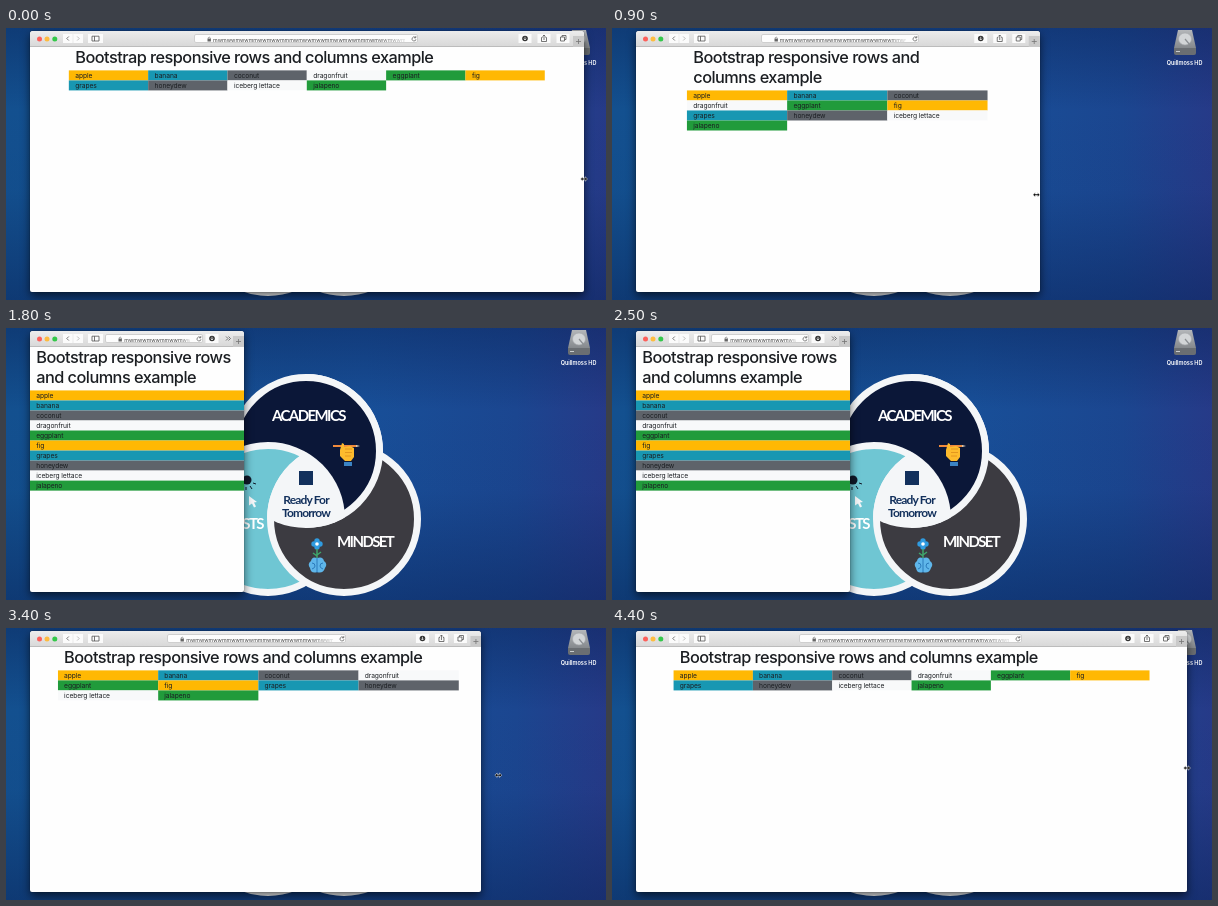
An HTML page that plays this animation: 600 by 272 pixels, repeating every 4500 ms.

```html
<!DOCTYPE html>
<html lang="en">
<head>
<meta charset="utf-8">
<title>Responsive rows and columns</title>
<style>
  html, body { margin: 0; width: 100%; height: 100%; overflow: hidden; background: #0d3066; }
  #stage { position: relative; width: 600px; height: 272px; overflow: hidden; }
  svg { position: absolute; left: 0; top: 0; display: block; }
  .wide { font: 700 15px Lato, sans-serif; letter-spacing: -1.6px; fill: #fff; }
  .motto { font: 700 12px Lato, sans-serif; letter-spacing: -.85px; fill: #12305c; text-anchor: middle; }
  .disk { font: 600 5.5px Inter, sans-serif; fill: #fff; text-anchor: middle; }

  #win { position: absolute; left: 24px; top: 3px; height: 261px; overflow: hidden; background: #fefefe;
    border-radius: 3px 3px 2px 2px; box-shadow: 0 4px 10px #0009, 0 0 1px #000a; }
  #tools { position: absolute; left: 0; top: 0; width: 100%; height: 16px; box-sizing: border-box;
    background: linear-gradient(#ececec, #d9d9d9); border-bottom: 1px solid #bcbcbc; }
  #bar { position: absolute; top: 3px; height: 9px; box-sizing: border-box; background: #fdfdfd;
    border: .5px solid #cfcfcf; border-radius: 2px; overflow: hidden; }
  #url { position: absolute; left: 18px; right: 12px; top: .5px; overflow: hidden; white-space: nowrap;
    font: 5.3px/8px Inter, sans-serif; color: #444;
    -webkit-mask: linear-gradient(90deg, #000 85%, #0003); mask: linear-gradient(90deg, #000 85%, #0003); }
  #reload { left: auto; right: -1px; }

  #page { position: absolute; left: 0; top: 15.5px; transform: scale(.4175); transform-origin: 0 0;
    font: 400 16px/24px Inter, sans-serif; letter-spacing: -.2px; color: #1b1e22; }
  #box { margin: 0 auto; }
  h1 { margin: 0 0 8px; padding: 0 15px; font-size: 39px; font-weight: 500; line-height: 48px; letter-spacing: -1.25px; }
  #row { display: flex; flex-wrap: wrap; }
  #row div { box-sizing: border-box; padding: 0 15px; height: 24px; white-space: nowrap; }
</style>
</head>
<body>
<div id="stage">
  <svg width="600" height="272">
    <defs>
      <linearGradient id="sky">
        <stop stop-color="#13508f"/><stop offset=".6" stop-color="#184f98"/><stop offset=".85" stop-color="#1b4690"/><stop offset="1" stop-color="#263a88"/>
      </linearGradient>
      <linearGradient id="shade" x2="0" y2="1">
        <stop stop-color="#0a2358" stop-opacity=".45"/><stop offset=".3" stop-color="#0a2358" stop-opacity="0"/>
        <stop offset=".6" stop-color="#0a2358" stop-opacity=".05"/><stop offset="1" stop-color="#0a2358" stop-opacity=".5"/>
      </linearGradient>
      <linearGradient id="metal" x2="0" y2="1"><stop stop-color="#b4b7ba"/><stop offset="1" stop-color="#85898d"/></linearGradient>
      <clipPath id="inA"><circle cx="300" cy="123" r="77"/></clipPath>
      <clipPath id="inB"><circle cx="262" cy="191" r="77"/></clipPath>
      <clipPath id="right"><path d="M300 0H600V272H300z"/></clipPath>
    </defs>
    <rect width="600" height="272" fill="url(#sky)"/>
    <rect width="600" height="272" fill="url(#shade)"/>
    <g stroke="#f4f6f8" stroke-width="7">
      <circle id="top" cx="300" cy="123" r="73.500" fill="#0b1738"/>
      <circle cx="262" cy="191" r="73.500" fill="#6fc6d3"/>
      <circle cx="338" cy="191" r="73.500" fill="#3c3b41"/>
      <use href="#top" clip-path="url(#right)"/>
    </g>
    <g clip-path="url(#inA)"><g clip-path="url(#inB)"><circle cx="338" cy="191" r="77" fill="#f4f6f8"/></g></g>
    <text class="wide" x="266" y="92.500">ACADEMICS</text>
    <text class="wide" x="331" y="218.500">MINDSET</text>
    <text class="wide" x="257" y="201" text-anchor="end">INTERESTS</text>
    <rect x="293" y="143" width="14" height="14" fill="#12305c"/>
    <text class="motto" x="300" y="176">Ready For</text>
    <text class="motto" x="300" y="188.500">Tomorrow</text>
    <!-- hand with pencil -->
    <path d="M327 118H350" stroke="#f08a3c" stroke-width="2"/>
    <path d="M350 117L354 118L350 119z" fill="#f3dfc0"/>
    <path d="M334 122l2-7 2 1v3l6-1 4 2v9l-3 4h-6l-5-5z" fill="#fdbb2d"/>
    <path d="M339 121h7M339 124.500h7M339 128h6" stroke="#dd8f1c" stroke-width=".8"/>
    <path d="M338 134h8v4h-8z" fill="#3b83c4"/>
    <!-- flower over brain -->
    <g fill="#2f9be0"><circle cx="311" cy="213" r="2.700"/><circle cx="308" cy="216" r="2.700"/><circle cx="314" cy="216" r="2.700"/><circle cx="311" cy="219" r="2.700"/></g>
    <circle cx="311" cy="216" r="1.800" fill="#fff"/>
    <path d="M311 221V230M311 227l4-3M311 228l-4-3" stroke="#3fa66b" stroke-width="1.500" fill="none"/>
    <path d="M311 230q-5-2-6 3q-4 3-1 7q1 6 7 4q6 2 8-4q3-4-1-7q-1-5-7-3z" fill="#5fb6ea"/>
    <path d="M311 230V245M306 235q3 0 3 3M317 235q-3 0-3 3M306 241q3-1 3-3M317 241q-3-1-3-3" stroke="#1f6db0" stroke-width=".8" fill="none"/>
    <!-- click mark and pointer -->
    <circle cx="241" cy="152" r="4.500" fill="#101828"/>
    <path d="M244 158l2 3M247 155l3 1M240 159v3" stroke="#101828"/>
    <path d="M243 168l8 6-3 .5 2 4-2 1-2-4-3 2z" fill="#f4f6f8"/>
    <!-- disk -->
    <path d="M566 2H580L584 20H562z" fill="url(#metal)"/>
    <path d="M562 20H584V25q0 2-2 2H564q-2 0-2-2z" fill="#6a6e72"/>
    <ellipse cx="573" cy="11" rx="6.500" ry="6" fill="#d2d5d7" stroke="#a4a8ac" stroke-width=".6"/>
    <path d="M573 11l5 6" stroke="#8b8f93" stroke-width="1.200"/>
    <path d="M564 23.500H568" stroke="#c8cccf"/>
    <text class="disk" x="572.500" y="37">Quillmoss HD</text>
  </svg>

  <div id="win">
    <div id="tools">
      <svg width="576" height="16" viewBox="24 3 576 16" fill="none" stroke="#555" stroke-width=".8">
        <g stroke="none">
          <circle cx="33.500" cy="11" r="2.500" fill="#fc605b"/><circle cx="41" cy="11" r="2.500" fill="#fdbc40"/><circle cx="48.800" cy="11" r="2.500" fill="#34c84a"/>
          <path d="M57 6h9.700v9H57zM67.300 6H77v9h-9.700zM82 6H97v9H82z" fill="#fbfbfb"/>
        </g>
        <path d="M62.800 8.500l-2 2 2 2"/><path d="M71.200 8.500l2 2-2 2" stroke="#aaa"/>
        <path d="M86 8.200h7v4.800h-7zM88.500 8.200V13"/>
        <g id="full">
          <path d="M-65.500 6h13v9h-13zM-46.500 6h13v9h-13zM-27.500 6h13v9h-13z" fill="#fbfbfb" stroke="none"/>
          <path d="M-41.500 9.500h-1v4h5v-4h-1M-40 12V7M-41.500 8.500l1.500-1.500 1.500 1.500M-23.500 9h4v4h-4zM-22 9V7.500h4v4h-1.500"/>
        </g>
        <g id="slim">
          <path d="M-38.500 6h13v9h-13z" fill="#fbfbfb" stroke="none"/>
          <path d="M-18 8.500l2 2-2 2M-15.500 8.500l2 2-2 2"/>
        </g>
        <g id="load"><circle cy="10.500" r="2.800" fill="#333" stroke="none"/><path d="M0 8.800v3M-1.300 10.700l1.300 1.300 1.300-1.300" stroke="#fff" stroke-width=".7"/></g>
        <g id="plus"><path d="M-11 8H0V19H-11z" fill="#c9c9c9" stroke="none"/><path d="M-8 13.500h5M-5.500 11v5" stroke="#777"/></g>
      </svg>
      <div id="bar">
        <svg width="18" height="9"><path d="M12.500 3.800h3.400v2.700h-3.400z" fill="#666"/><path d="M13.200 4V2.800q1-1.500 2 0V4" fill="none" stroke="#666" stroke-width=".6"/></svg>
        <div id="url"></div>
        <svg id="reload" width="8" height="8"><path d="M5.500 2.600A2 2 0 1 0 6 4.200M5.800 1v1.800H4" fill="none" stroke="#555" stroke-width=".7"/></svg>
      </div>
    </div>
    <div id="page"><div id="box">
      <h1>Bootstrap responsive rows and columns&nbsp;example</h1>
      <div id="row"></div>
    </div></div>
  </div>

  <svg width="600" height="272">
    <g id="cursor"><path d="M-3.500 0l2.300-2.200v1.400h2.400v-1.400L3.500 0 1.200 2.200V.8h-2.400v1.400z" fill="#111" stroke="#fff" stroke-width=".5"/></g>
  </svg>
</div>
<script>
const $ = id => document.getElementById(id);
const LEFT = 24, SCALE = .4175, STEP = 100, LOOP = 4500, MIN_EDGE = 238;
const fruits = 'apple,banana,coconut,dragonfruit,eggplant,fig,grapes,honeydew,iceberg lettace,jalapeno'.split(',');
const tints = ['#ffb803', '#1897b2', '#5e636a', '#f8f9fa', '#219b3b'];
// Smallest page width, container width, columns
const grid = [[1200, 1140, 6], [992, 960, 4], [768, 720, 3], [576, 540, 2], [0, 0, 1]];

// Time, window edge, pointer x, pointer y
const drag = [
  [0, 578, 578, 151], [500, 514, 514, 151], [1200, 356, 351, 177], [1750, 238, 238, 177],
  [2500, 238, 238, 170], [3000, 385, 406, 157], [3900, 552, 559, 140], [4400, 575, 575, 140], [4500, 578, 578, 151]
];

const cells = fruits.map((name, i) => {
  const cell = document.createElement('div');
  cell.textContent = name;
  cell.style.background = tints[i % tints.length];
  $('row').append(cell);
  return cell;
});
$('url').textContent = 'mwmwwmwwmmwwmwwmm'.repeat(5);

// Monotone cubic through one column of the drag path
function along(t, col) {
  const secant = i => (drag[i + 1][col] - drag[i][col]) / (drag[i + 1][0] - drag[i][0]);
  const slope = i => {
    if (i === 0 || i === drag.length - 1) return secant(i ? i - 1 : 0);
    const a = secant(i - 1), b = secant(i);
    return a * b > 0 ? 2 * a * b / (a + b) : 0;
  };
  let i = 0;
  while (i < drag.length - 2 && t >= drag[i + 1][0]) i++;
  const h = drag[i + 1][0] - drag[i][0], u = (t - drag[i][0]) / h, v = 1 - u;
  return v * v * (1 + 2 * u) * drag[i][col] + u * u * (3 - 2 * u) * drag[i + 1][col]
    + h * u * v * (v * slope(i) - u * slope(i + 1));
}

const move = (id, x, y = 0) => $(id).setAttribute('transform', `translate(${x} ${y})`);
const show = (id, on) => $(id).style.display = on ? '' : 'none';

function draw(t) {
  const edge = along(t, 1), x = along(t, 2), y = along(t, 3);
  const width = edge - LEFT, narrow = width < 250;

  $('win').style.width = width + 'px';
  for (const id of ['full', 'slim', 'plus']) move(id, edge);
  move('load', edge - (narrow ? 32 : 59));
  show('full', !narrow);
  show('slim', narrow);
  const barLeft = 43.5 + .261 * width;
  const barRight = narrow ? edge - 41 : 25 + .698 * width;
  $('bar').style.left = barLeft - LEFT + 'px';
  $('bar').style.width = barRight - barLeft + 'px';

  // The page layout runs slightly ahead of the window frame
  const view = (width + .3 * (x - edge)) / SCALE;
  const [, box, cols] = grid.find(([min]) => view >= min);
  $('page').style.width = view + 'px';
  $('box').style.width = box ? box + 'px' : '100%';
  for (const cell of cells) cell.style.width = 100 / cols + '%';

  move('cursor', x, y);
  show('cursor', edge > MIN_EDGE + 1);
}

function tick() {
  draw(Math.floor(performance.now() % LOOP / STEP) * STEP);
  requestAnimationFrame(tick);
}
tick();
</script>
</body>
</html>
```
